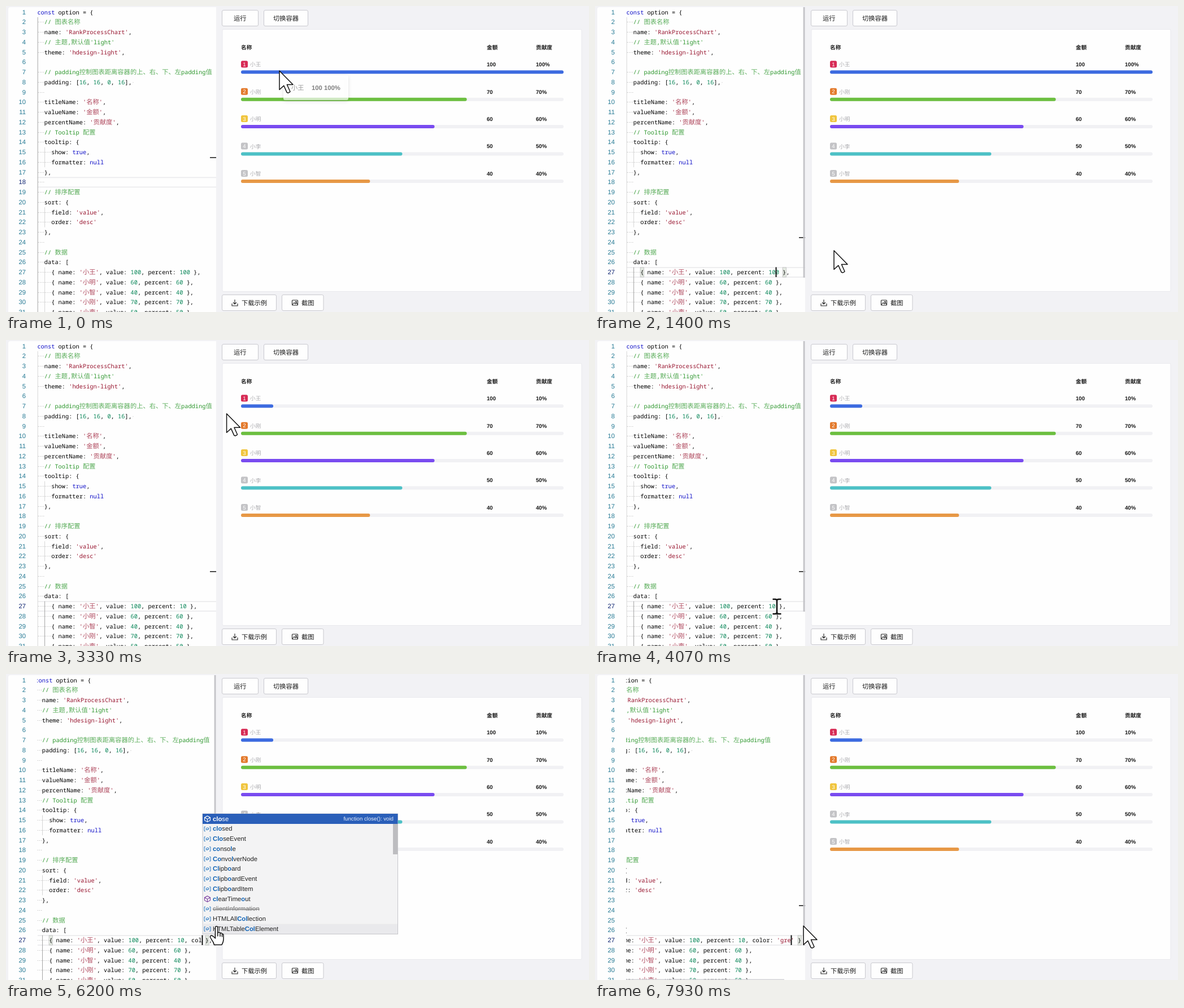
Animation of 1032x543 px, one loop 8000 ms. Source, as an HTML page:

```html
<!DOCTYPE html>
<html lang="zh">
<head>
<meta charset="utf-8">
<title>Rank process chart editor</title>
<style>
html, body { margin: 0; width: 100%; height: 100%; overflow: hidden; background: #f2f2f5; }
svg { display: block; width: 1032px; height: 543px; }
text { white-space: pre; text-rendering: geometricPrecision; font-family: "Liberation Sans", "Noto Sans CJK SC", "Noto Sans CJK", sans-serif; }
.code { font: 10.333px "Noto Sans Mono", "DejaVu Sans Mono", monospace; fill: #000; }
.cjk { font: 300 11.27px "Noto Sans CJK SC", "Noto Sans CJK", sans-serif; fill-opacity: .78; }
.kw { fill: #1010c8; } .str { fill: #98152f; } .num { fill: #098658; } .com { fill: #2c962c; }
.ui { font-size: 11.27px; font-weight: 500; fill: #191919; }
.head { font-size: 9.66px; font-weight: 700; fill: #191919; }
.hit { font-weight: 700; fill: #0f62b5; }
</style>
</head>
<body>
<svg id="stage" viewBox="0 0 1032 543">
  <defs>
    <clipPath id="pane"><rect x="55" y="2" width="312" height="541"/></clipPath>
    <filter id="soft" x="-20%" y="-30%" width="140%" height="170%"><feDropShadow dx="0" dy="2" stdDeviation="3" flood-color="#000" flood-opacity=".2"/></filter>
  </defs>
  <path d="M4 543V6q0-4 4-4H372V543Z" fill="#fefefe"/>
  <g id="current"></g>
  <g clip-path="url(#pane)"><g id="code"></g></g>
  <g id="numbers"></g>
  <rect id="caret" y="463.5" width="2" height="17.5" fill="#111"/>
  <rect id="mark" x="361" width="11" height="2" fill="#4a4a4a"/>
  <g id="thumbs" fill="#c4c4c8"><rect x="368.6" y="2" width="3" height="480"/><rect id="low" x="55" y="541.5" width="280" height="2" fill="#d4d4d8"/></g>
  <rect x="383" y="41.5" width="636" height="465" rx="2" fill="#fefefe" stroke="#e9e9ee"/>
  <g id="ui"></g>
  <g id="chart"></g>
  <g id="tip">
    <rect x="491" y="123" width="115" height="44" rx="3" fill="#fff" fill-opacity=".9" filter="url(#soft)"/>
    <text x="505" y="149" font-size="11.27" fill="#777">小王</text>
    <text x="541" y="149" font-size="11.27" font-weight="700" fill="#555">100 100%</text>
  </g>
  <g id="popup"></g>
  <g id="mouse" stroke="#111" stroke-linejoin="round" stroke-linecap="round" fill="#fff">
    <path id="arrow" stroke-width="1.5" d="M0 0V33.5L7.8 26.4L13.2 38.4Q16 40.5 19 37L13.4 24.5H24Z"/>
    <path id="beam" fill="none" stroke-width="2.6" stroke-linecap="butt" d="M-7.5 -12H-3Q0 -12 0 -9V11Q0 14 -3 14H-7.5M7.5 -12H3Q0 -12 0 -9V11Q0 14 3 14H7.5"/>
    <g id="hand" stroke-width="1.5">
      <path d="M1.5 19V3Q1.5 .8 3.6 .8T5.8 3V12Q9.5 10 10 13Q13 11.5 13.5 14.5Q16 13.5 16 17V24Q16 28 13 33.5H-.5Q-1.5 29-5 24.5L-7.5 20Q-7.8 17-5 17Q-3 17.5 1.5 22Z"/>
      <path d="M5.8 12V18M10 13.5V18.5M13.5 15V19" fill="none"/>
    </g>
  </g>
</svg>
<script>
const LOOP = 8000, CH = 6.2, HAN = 11.27, X0 = 55.4, ROW = 17.75;
const $ = id => document.getElementById(id);
const mid = n => 11 + ROW * (n - 1);
const isHan = c => c > '\u2e80';
const width = s => [...s].reduce((w, c) => w + (isHan(c) ? HAN : CH), 0);
const show = (id, on) => $(id).setAttribute('visibility', on ? 'visible' : 'hidden');
const ease = u => u * u * (3 - 2 * u);
const unit = (t, a, b) => Math.min(1, Math.max(0, (t - a) / (b - a)));

const item = (name, v, p = v) => `    { name: '${name}', value: ${v}, percent: ${p} },`;
const LINES = [
  'const option = {', '  // 图表名称', "  name: 'RankProcessChart',", "  // 主题,默认值'light'",
  "  theme: 'hdesign-light',", '', '  // padding控制图表距离容器的上、右、下、左padding值',
  '  padding: [16, 16, 0, 16], ', '  ', "  titleName: '名称',", "  valueName: '金额',",
  "  percentName: '贡献度',", '  // Tooltip 配置', '  tooltip: {', '    show: true,',
  '    formatter: null', '  },', '  ', '  // 排序配置', '  sort: {', "    field: 'value',",
  "    order: 'desc'", '  },', '  ', '  // 数据', '  data: [', item('小王', 100),
  item('小明', 60), item('小智', 40), item('小刚', 70), item('小李', 50)
];

// time, text before the caret, text after it, optional scroll
const KEYS = [
  [0, '100', ''], [1000, '10', '0'], [1700, '10', ''], [4100, '10', ''], [4800, '10,', ''],
  [5050, '10, ', ''], [5700, '10, c', ''], [5900, '10, co', ''], [6100, '10, col', ''],
  [6450, '10, colo', ''], [6650, '10, color', ''], [6930, '10, color:', '', 26],
  [7250, '10, color: ', ''], [7450, "10, color: '", "'"], [7600, "10, color: 'g", "'"],
  [7750, "10, color: 'gr", "'"], [7870, "10, color: 'gre", "'"]
];
const PATH = [
  [0, 484, 115], [70, 484, 115], [700, 322, 472], [1050, 322, 472], [1350, 423, 434],
  [1800, 423, 434], [2450, 423, -4], [2650, 423, -4], [2850, 414, 14], [3100, 414, 14],
  [3800, 322, 472], [4300, 322, 472], [4700, 369, 447], [LOOP, 369, 447]
];

function tint(s) {
  const kinds = ['com', 'str', 'num', 'kw', ''];
  return s.replace(/(\/\/.*)|('[^']*'?)|(\b\d+\b)|(\b(?:const|true|null)\b)|([^'\/\d]+?(?=\b|'|\/|$))/g, (all, ...g) => {
    const kind = kinds[g.slice(0, 5).findIndex(v => v !== undefined)];
    const body = all.replace(/[\u2e80-\uffff]+/g, h => `<tspan class="cjk">${h}</tspan>`);
    return kind ? `<tspan class="${kind}">${body}</tspan>` : body;
  });
}

function codeLine(s, n) {
  const pad = s.length - s.trimStart().length, y = mid(n);
  const dots = pad ? `<path d="M${X0 + 1.6} ${Math.floor(y) + .5}h${pad * CH - 2}" stroke="#b0b0b0" stroke-dasharray="1 2.1"/>` : '';
  return `${dots}<text class="code" x="${X0 + pad * CH}" y="${y + 3.7}">${tint(s.slice(pad))}</text>`;
}

function buildCode() {
  const guide = (col, a, b, id = '') =>
    `<path ${id} d="M${X0 + col * CH + .8} ${mid(a) - 8.9}V${mid(b) + 8.9}" stroke="#d6d6d6"/>`;
  $('code').innerHTML = guide(0, 2, 31, 'id="g0"') + guide(2, 15, 16) + guide(2, 21, 22) +
    guide(2, 27, 31, 'id="g2"') + '<g id="pair" fill="#e6ece4" stroke="#b9b9b9" stroke-width=".8"></g>' +
    LINES.map((s, i) => i === 26 ? '<g id="live"></g>' : codeLine(s, i + 1)).join('') +
    `<circle cx="225" cy="${mid(8) + .5}" r=".6" fill="#b0b0b0"/>`;
  $('numbers').innerHTML = LINES.map((s, i) =>
    `<text id="n${i + 1}" x="35" y="${mid(i + 1) + 3.7}" text-anchor="end" font-size="11.27" fill="#237893">${i + 1}</text>`).join('');
}

function buildUi() {
  const button = (x, y, w, label, lx) =>
    `<rect x="${x + .5}" y="${y + .5}" width="${w}" height="28" rx="2.5" fill="#fefefe" stroke="#c9c9cf"/><text class="ui" x="${lx}" y="${y + 19}">${label}</text>`;
  $('ui').innerHTML = button(382, 7, 64, '运行', 403) + button(456, 7, 78, '切换容器', 473) +
    button(382, 512, 96, '下载示例', 417) + button(488, 512, 73.5, '截图', 523) +
    `<g fill="none" stroke="#222" stroke-width="1.1"><path d="M405 521v8m-3-3l3 3l3-3M400 528v4h10v-4"/>
    <rect x="506.5" y="522" width="10" height="9" rx="1"/><path d="M507 530l3-3.5l2.5 2l1.5-1.5l2.5 2.5"/><circle cx="513.5" cy="525" r="1"/></g>`;
  const rows = [['小王', 100, '#d72b55', '#3d6be0'], ['小刚', 70, '#e37a2c', '#6cbf40'],
    ['小明', 60, '#f0c53e', '#794bf0'], ['小李', 50, '#c3c3c6', '#4dc1c6'], ['小智', 40, '#c3c3c6', '#e79846']];
  $('chart').innerHTML = [['名称', 416], ['金额', 851], ['贡献度', 938]].map(([s, x]) =>
    `<text class="head" x="${x}" y="76.5">${s}</text>`).join('') + rows.map(([name, v, badge, color], i) => {
    const y = 103.5 + i * 48.4, bar = `x="416" y="${y + 10.8}" height="6" rx="3"`;
    return `<rect x="416" y="${y - 6.2}" width="12" height="12" rx="2.5" fill="${badge}"/>
      <text x="422" y="${y + 3.5}" text-anchor="middle" font-size="9.66" fill="#fff">${i + 1}</text>
      <text x="432" y="${y + 3.8}" font-size="9.66" fill="#a9a9ad">${name}</text>
      <text class="head" x="851" y="${y + 3.6}">${v}</text>
      <text class="head" id="pct${i}" x="938" y="${y + 3.6}">${v}%</text>
      <rect ${bar} width="571" fill="#f1f1f4"/>
      <rect ${bar} id="bar${i}" width="${5.71 * v}" fill="${color}"/>`;
  }).join('');
}

function buildPopup() {
  // asterisks enclose the highlighted letters
  const names = ['*clo*se', '*clo*sed', '*Clo*seEvent', '*co*nso*l*e', '*Co*nvo*l*verNode', '*Cl*ipb*o*ard',
    '*Cl*ipb*o*ardEvent', '*Cl*ipb*o*ardItem', '*cl*earTime*o*ut', 'clientInformation', 'HTMLAll*Col*lection', 'HTMLTable*Col*Element'];
  const cube = (y, c) => `<path d="M356.5 ${y - 5}l5 2.7v5l-5 2.7l-5-2.7v-5zM351.5 ${y - 2.3}l5 2.7l5-2.7M356.5 ${y + .4}v5" fill="none" stroke="${c}" stroke-width="1.1"/>`;
  const field = y => `<path d="M353 ${y - 3.5}h-2v7.5h2M360 ${y - 3.5}h2v7.5h-2M354 ${y + 1}v-1.5l3-1.5l2 1v1.5l-3 1.5zl2 .8l3-1.8" fill="none" stroke="#2f7cc4"/>`;
  $('popup').innerHTML = `<rect x="348" y="248" width="345.5" height="213.5" fill="#f3f3f4" stroke="#c6c6ca"/>
    <rect x="348.5" y="443.5" width="344.5" height="17.5" fill="#e9e9ec"/>
    <rect x="348" y="248" width="345.5" height="18" fill="#2a5fb9"/>
    <rect x="685" y="266" width="8" height="54" fill="#bdbdc0"/>
    <text x="686" y="260.3" text-anchor="end" font-size="9.66" fill="#e8eefa">function close(): void</text>` +
    names.map((s, i) => {
      const y = 257 + i * ROW, first = i === 0, old = i === 9;
      const body = s.split('*').map((p, k) => k % 2 ? `<tspan class="hit"${first ? ' style="fill:#fff"' : ''}>${p}</tspan>` : p).join('');
      const icon = first ? cube(y, '#fff') : i === 8 ? cube(y, '#7b3fa0') : field(y);
      return icon + `<text x="366" y="${y + 3.7}" font-size="11.27" fill="${first ? '#fff' : old ? '#777' : '#222'}"${old ? ' text-decoration="line-through"' : ''}>${body}</text>`;
    }).join('');
}

function mouseAt(t) {
  const i = Math.max(1, PATH.findIndex(p => p[0] > t));
  const a = PATH[i - 1], b = PATH[i], u = ease(unit(t, a[0], b[0]));
  return [a[1] + (b[1] - a[1]) * u, a[2] + (b[2] - a[2]) * u];
}

let lastKey = null;
function draw(t) {
  const key = KEYS.filter(k => k[0] <= t).pop();
  const [at, left, right] = key;
  const prefix = "    { name: '小王', value: 100, percent: ";
  const caret = X0 + width(prefix + left) + .8;
  const shift = key[3] ?? Math.max(0, caret - 347.5);
  const editing = t >= 1000, focused = editing && (t < 2900 || t >= 4100);
  const line = editing ? 27 : 18;

  if (key !== lastKey) {
    lastKey = key;
    $('live').innerHTML = codeLine(prefix + left + right + ' },', 27);
    const end = X0 + width(prefix + left + right + ' ');
    $('pair').innerHTML = [X0 + 4 * CH, end].map(x => `<rect x="${x}" y="464" width="6.2" height="17"/>`).join('');
    $('code').setAttribute('transform', `translate(${-shift})`);
    $('current').innerHTML = `<path d="M56 ${mid(line) - 8.3}H372M56 ${mid(line) + 8.7}H372" stroke="#ebebed" stroke-width="1.7"/>`;
    $('n18').setAttribute('fill', editing ? '#237893' : '#0b216f');
    $('n27').setAttribute('fill', editing ? '#0b216f' : '#237893');
    $('g0').setAttribute('stroke', editing ? '#d6d6d6' : '#a4a4a4');
    $('g2').setAttribute('stroke', editing ? '#a4a4a4' : '#d6d6d6');
    $('mark').setAttribute('y', editing ? 410 : 268);
  }
  show('pair', focused && !(t >= 4100 && t < 4800));
  show('caret', focused && (t - at) % 1000 < 500);
  $('caret').setAttribute('x', (shift ? 347.5 : caret) - 1);
  const thumb = t < 2700 ? unit(t, 400, 500) * (1 - unit(t, 1700, 2200)) : unit(t, 3450, 3600);
  $('thumbs').setAttribute('opacity', thumb);
  show('low', t >= 6800);

  const p = 100 - 90 * ease(unit(t, 2950, 3250));
  $('bar0').setAttribute('width', 5.71 * p);
  $('pct0').textContent = t < 2950 ? '100%' : '10%';
  $('tip').setAttribute('opacity', .75 * (1 - unit(t, 70, 330)));

  const popup = t >= 5900 && t < 6450;
  show('popup', popup);
  const [x, y] = mouseAt(t);
  const onRun = x > 382 && x < 447 && y > 7 && y < 36;
  const shape = popup || onRun ? 'hand' : x < 368 ? 'beam' : 'arrow';
  for (const id of ['arrow', 'beam', 'hand']) show(id, id === shape);
  $('mouse').setAttribute('transform', `translate(${x} ${y})`);
}

buildCode();
buildUi();
buildPopup();
const start = performance.now();
function tick(now) {
  draw(Math.max(0, now - start) % LOOP);
  requestAnimationFrame(tick);
}
draw(0);
requestAnimationFrame(tick);
</script>
</body>
</html>
```
